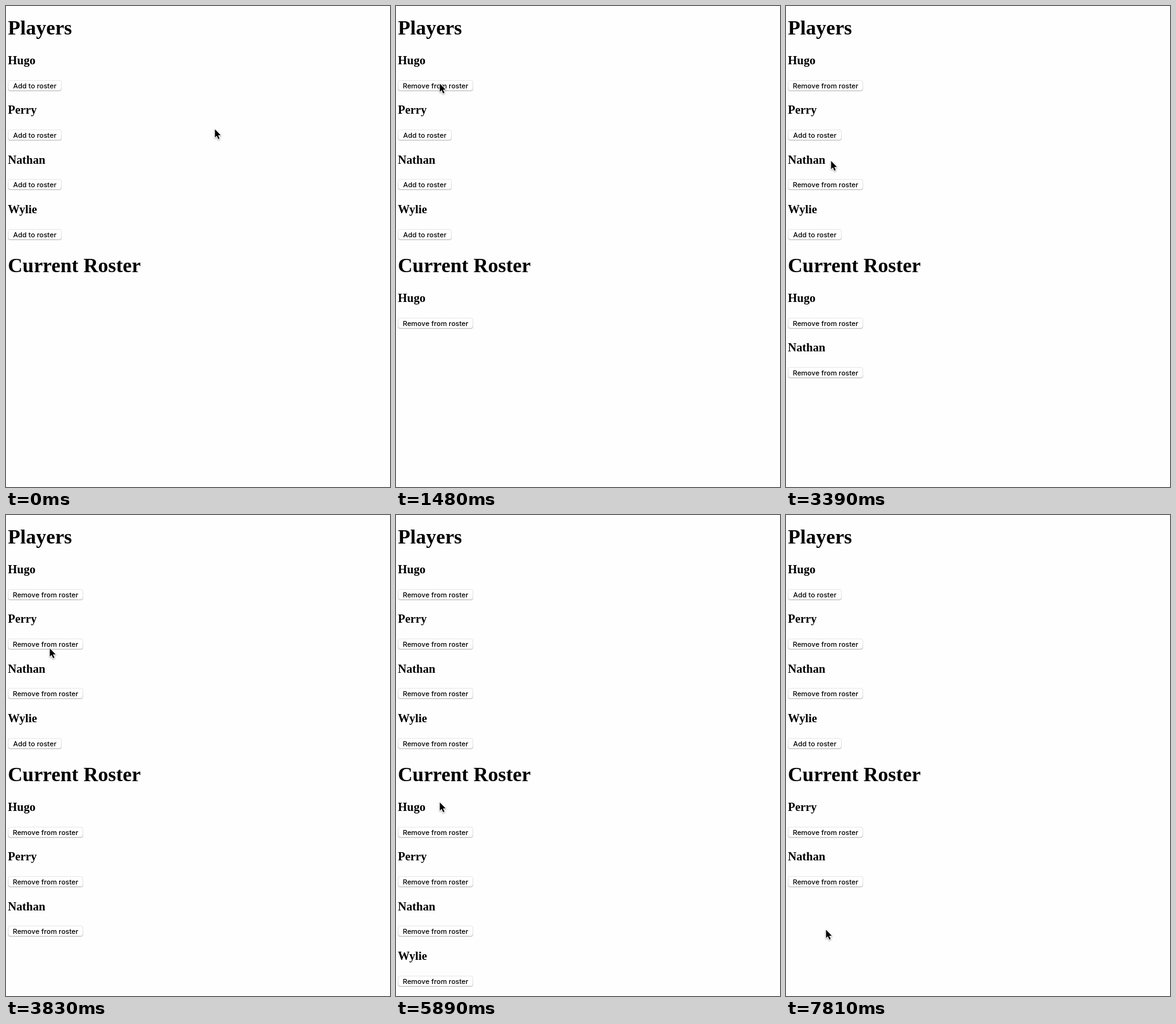
An HTML page that plays this animation: 607x759 px, repeating every 8 s.

```html
<!DOCTYPE html>
<html lang="en">
<head>
<meta charset="utf-8">
<title>Roster</title>
<style>
  html, body { margin: 0; width: 100%; height: 100%; overflow: hidden; background: #fefefe; }
  svg { display: block; width: 607px; height: 759px; }
  .h1, .h3 { font-family: "Liberation Serif", Times, serif; font-weight: bold; }
  .h1 { font-size: 32px; }
  .h3 { font-size: 18.72px; }
  .label { font: 500 11px Inter, sans-serif; text-anchor: middle; }
  #cursor { filter: drop-shadow(0 1px 1px rgba(0, 0, 0, .35)); }
</style>
</head>
<body>
<svg viewBox="0 0 607 759">
  <defs>
    <linearGradient id="blue" x2="0" y2="1">
      <stop stop-color="#459af8"/>
      <stop offset="1" stop-color="#0560e5"/>
    </linearGradient>
    <linearGradient id="edge" x2="0" y2="1">
      <stop stop-color="#e8e8e8"/>
      <stop offset=".7" stop-color="#e0e0e0"/>
      <stop offset="1" stop-color="#c6c6c6"/>
    </linearGradient>
  </defs>
  <text class="h1" x="3" y="45">Players</text>
  <text class="h1" x="3" y="420">Current Roster</text>
  <g id="rows"></g>
  <path id="cursor" d="M0 0V13L2.9 10.2L5.2 15.5L7.3 14.6L5 9.4H9.2Z"
        stroke="#fff" stroke-width="2" stroke-linejoin="round" paint-order="stroke"/>
</svg>
<script>
const LOOP = 8000;
const ROW = 78.3;
const ROSTER_TOP = 375;
const players = ["Hugo", "Perry", "Nathan", "Wylie"];
const rows = document.getElementById("rows");
const cursor = document.getElementById("cursor");

// Each click toggles a player; the button is blue from `down` until `up`.
const clicks = [
  { down: 1333, up: 1480, player: 0, list: "players" },
  { down: 2660, up: 2810, player: 2, list: "players" },
  { down: 3684, up: 3830, player: 1, list: "players" },
  { down: 4858, up: 5004, player: 3, list: "players" },
  { down: 6630, up: 6630, player: 0, list: "roster" },
  { down: 7662, up: 7810, player: 3, list: "roster" }
];

const start = [330, 194];
const moves = [
  { at: 450, step: 147, steps: 6, to: [69, 122], bend: 0 },
  { at: 1630, step: 146, steps: 6, to: [73, 277], bend: 3 },
  { at: 3100, step: 146, steps: 4, to: [69, 210], bend: 0 },
  { at: 4130, step: 146, steps: 5, to: [74, 354], bend: 0 },
  { at: 5150, step: 146, steps: 1, to: [72, 355], bend: 0 },
  { at: 5300, step: 147, steps: 8, to: [67, 498], bend: 0 },
  { at: 7070, step: 148, steps: 4, to: [63, 654], bend: 0 }
];

const ease = p => p * p * (3 - 2 * p);

function pointerAt(t) {
  let pos = start;
  for (const { at, step, steps, to, bend } of moves) {
    if (t < at) break;
    const p = ease(Math.min(1, (Math.floor((t - at) / step) + 1) / steps));
    const [x, y] = pos;
    pos = [x + (to[0] - x) * p + bend * 4 * p * (1 - p), y + (to[1] - y) * p];
  }
  return pos;
}

function button(y, label, pressed) {
  const w = label.startsWith("Add") ? 85 : 119;
  const box = (dx, dy, h, r, fill) =>
    `<rect x="${3 + dx}" y="${y + dy}" width="${w - 2 * dx}" height="${h}" rx="${r}" fill="${fill}"/>`;
  const face = pressed
    ? box(0, 0, 17.5, 3.5, "url(#blue)")
    : box(0, 1, 17, 4, "#e6e6e6") + box(0, 0, 17, 4, "url(#edge)") + box(1, 1, 15, 3, "#fff");
  return face + `<text class="label" x="${3 + w / 2}" y="${y + 13}">${label}</text>`;
}

function row(top, slot, name, label, pressed) {
  const nameY = top + Math.round(92.1 + ROW * slot);
  const buttonY = top + Math.floor(117.2 + ROW * slot);
  return `<text class="h3" x="3" y="${nameY}">${name}</text>` + button(buttonY, label, pressed);
}

let lastMarkup = "";

function render(t) {
  const chosen = players.map((_, i) =>
    clicks.filter(c => c.player === i && t >= c.up).length % 2 === 1);
  const press = clicks.find(c => t >= c.down && t < c.up);
  const isPressed = (list, i) => !!press && press.list === list && press.player === i;
  const action = i => chosen[i] ? "Remove from roster" : "Add to roster";

  let markup = "", slot = 0;
  players.forEach((name, i) => {
    markup += row(0, i, name, action(i), isPressed("players", i));
    if (chosen[i]) {
      markup += row(ROSTER_TOP, slot++, name, action(i), isPressed("roster", i));
    }
  });
  if (markup !== lastMarkup) rows.innerHTML = lastMarkup = markup;

  const [x, y] = pointerAt(t).map(Math.round);
  cursor.setAttribute("transform", `translate(${x + 0.3} ${y + 0.5})`);
}

const began = performance.now();
function frame() {
  render((performance.now() - began) % LOOP);
  requestAnimationFrame(frame);
}
frame();
</script>
</body>
</html>
```
